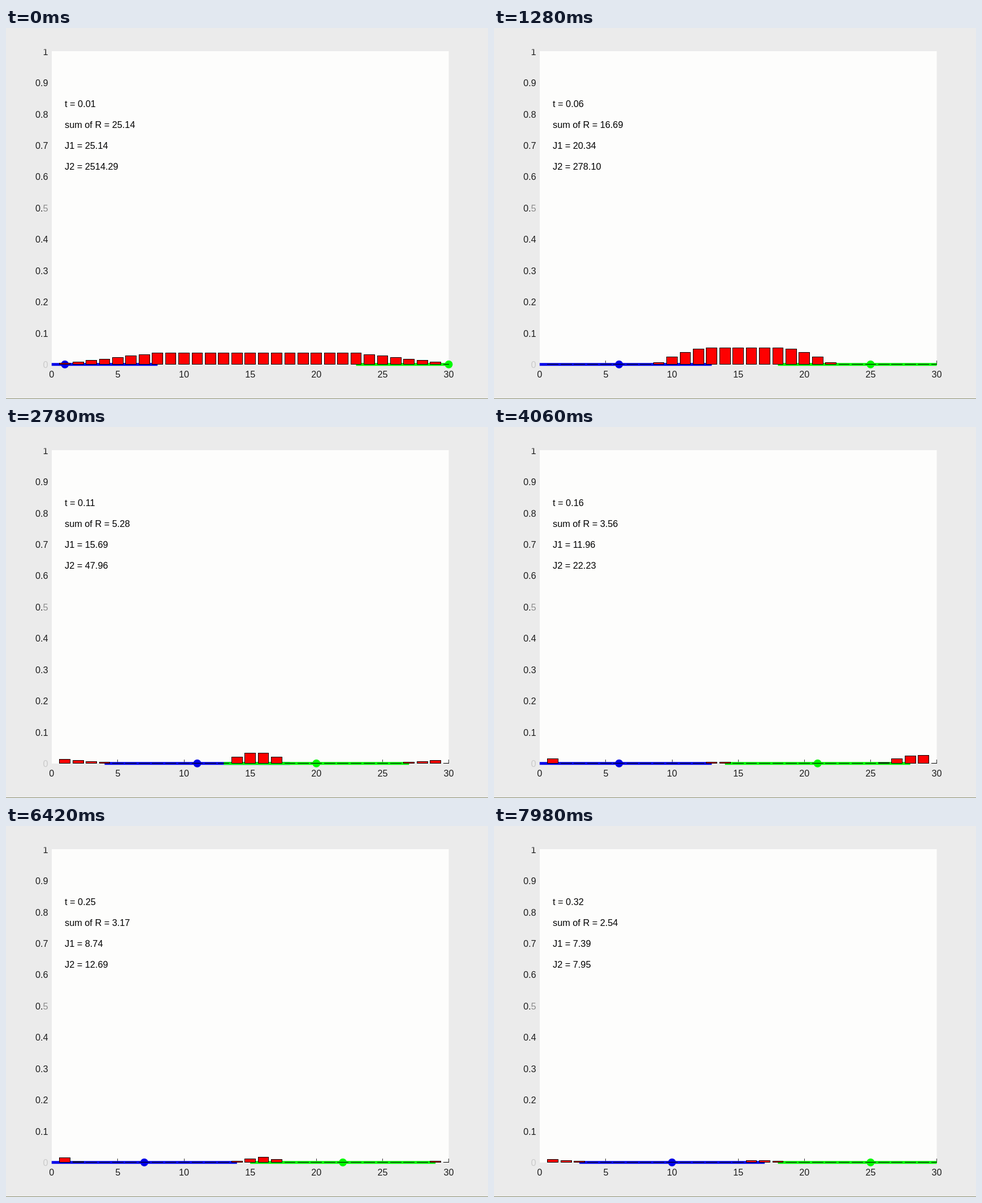
An HTML page that plays this animation: 853 by 657 pixels, repeating every 8 s.

```html
<!DOCTYPE html>
<html lang="en">
<head>
<meta charset="utf-8">
<title>Two agents monitoring a line</title>
<style>
  html, body { margin: 0; width: 100%; height: 100%; overflow: hidden; background: #ebebeb; }
  svg { display: block; width: 100%; height: 100%; }
  text { font-family: "Liberation Sans", Arial, sans-serif; }
  #xLabels, #yLabels { font-size: 16.2px; fill: #1c1c1c; }
  #xLabels { text-anchor: middle; }
  #yLabels { text-anchor: end; }
  #info { font-size: 16.3px; }
  #bars rect { fill: #f00; stroke: #000; stroke-width: 1; shape-rendering: crispEdges; }
</style>
</head>
<body>
<svg viewBox="0 0 853 657" preserveAspectRatio="none">
  <clipPath id="plotArea"><rect x="80" y="41" width="704" height="560"/></clipPath>
  <rect width="853" height="657" fill="#ebebeb"/>
  <rect y="656" width="853" height="1" fill="#8f9172"/>
  <rect x="81" y="41" width="702.5" height="555" fill="#fdfdfc"/>
  <g id="yLabels"></g>
  <rect x="60" y="30" width="18" height="7.5" fill="#ebebeb"/>
  <g id="xLabels"></g>
  <g id="ticks" stroke="#333" shape-rendering="crispEdges"></g>
  <g id="agents" stroke-width="5"></g>
  <g id="bars" clip-path="url(#plotArea)"></g>
  <g id="info"></g>
</svg>
<script>
const LOOP = 8000, STEPS = 32, POINTS = 30, RANGE = 7, BASE = 595.8;
const px = x => 80.8 + 23.425 * x;
const py = y => BASE - 554.4 * y;

function add(parent, tag, attrs, text) {
  const node = document.createElementNS('http://www.w3.org/2000/svg', tag);
  for (const key in attrs) node.setAttribute(key, attrs[key]);
  if (text !== undefined) node.textContent = text;
  return document.getElementById(parent).appendChild(node);
}

// One unit per step, reversing at each turning point.
function patrol([start, ...turns]) {
  const path = [start];
  for (const turn of turns) {
    let at = path[path.length - 1];
    while (at !== turn) path.push(at += Math.sign(turn - at));
  }
  return path;
}

const blue = patrol([1, 11, 5, 10, 5, 10]);
const green = patrol([30, 18, 26, 20, 25]);

// Uncertainty grows everywhere and shrinks where an agent senses it.
function simulate() {
  const miss = (x, agent) => Math.min(1, Math.abs(x - agent) / RANGE);
  const states = [];
  let level = Array(POINTS).fill(1), total = 0;
  for (let n = 1; n <= STEPS; n++) {
    const b = blue[n - 1], g = green[n - 1], t = n / 100;
    level = level.map((r, x) => Math.max(0, r + 0.1 - (1 - miss(x, b) * miss(x, g))));
    const sum = level.reduce((a, r) => a + r, 0);
    total += sum;
    states.push({ b, g, level, lines: [
      `t = ${t.toFixed(2)}`,
      `sum of R = ${sum.toFixed(2)}`,
      `J1 = ${(total / n).toFixed(2)}`,
      `J2 = ${(sum / t).toFixed(2)}`
    ] });
  }
  return states;
}

const states = simulate();

for (let i = 1; i <= 10; i++) {
  const label = add('yLabels', 'text', { x: 74.5, y: py(i / 10) + 6.3 }, i === 10 ? '1' : i === 5 ? '0.' : `0.${i}`);
  if (i === 5) {
    const digit = document.createElementNS(label.namespaceURI, 'tspan');
    digit.setAttribute('fill', '#8c8c8c');
    digit.textContent = '5';
    label.append(digit);
  }
}
add('yLabels', 'text', { x: 74.5, y: BASE + 6.2, fill: '#cacaca' }, '0');
for (let x = 0; x <= 30; x += 5) {
  add('xLabels', 'text', { x: px(x), y: 618.5 }, x);
  if (x) add('ticks', 'path', { d: `M${px(x)} 589V${BASE}` });
}

function makeAgent(color) {
  const line = add('agents', 'line', { y1: BASE, y2: BASE, stroke: color });
  const dot = add('agents', 'circle', { cy: BASE, r: 7, fill: color });
  return at => {
    line.setAttribute('x1', px(Math.max(0, at - RANGE)));
    line.setAttribute('x2', px(Math.min(30, at + RANGE)));
    dot.setAttribute('cx', px(at));
  };
}

const moveBlue = makeAgent('#0000e8');
const moveGreen = makeAgent('#00fa00');
const bars = Array.from({ length: POINTS }, (_, i) =>
  add('bars', 'rect', { x: px(i + 0.6), width: px(0.8) - px(0) }));
const info = [140, 177.3, 214, 251].map(y => add('info', 'text', { x: 104, y }));

// Ticks come in triples lasting 20, 20 and 100 ms.
function tickAt(ms) {
  const u = ms + 20, rest = u % 140;
  return 3 * Math.floor(u / 140) + (rest < 20 ? 0 : rest < 40 ? 1 : 2);
}

// [step, first tick]; the pace varies slightly between these.
const pace = [[1, 1], [17, 89], [22, 116], [26, 139], [32, 172]];

function stepAt(tick) {
  let i = 0;
  while (i < pace.length - 2 && tick >= pace[i + 1][1]) i++;
  const [n0, k0] = pace[i], [n1, k1] = pace[i + 1];
  const n = Math.floor(n0 + (tick - k0) * (n1 - n0) / (k1 - k0) + 1e-6);
  return Math.max(1, Math.min(STEPS, n));
}

let shown = 0;
function show(n) {
  if (n === shown) return;
  shown = n;
  const { b, g, level, lines } = states[n - 1];
  moveBlue(b);
  moveGreen(g);
  bars.forEach((bar, i) => {
    const top = py((level[i + 1] || 0) / POINTS);
    bar.setAttribute('y', top);
    bar.setAttribute('height', Math.max(0.01, BASE - top));
  });
  info.forEach((node, i) => node.textContent = lines[i]);
}

const begin = performance.now();
function frame() {
  show(stepAt(tickAt((performance.now() - begin) % LOOP)));
  requestAnimationFrame(frame);
}
frame();
</script>
</body>
</html>
```
